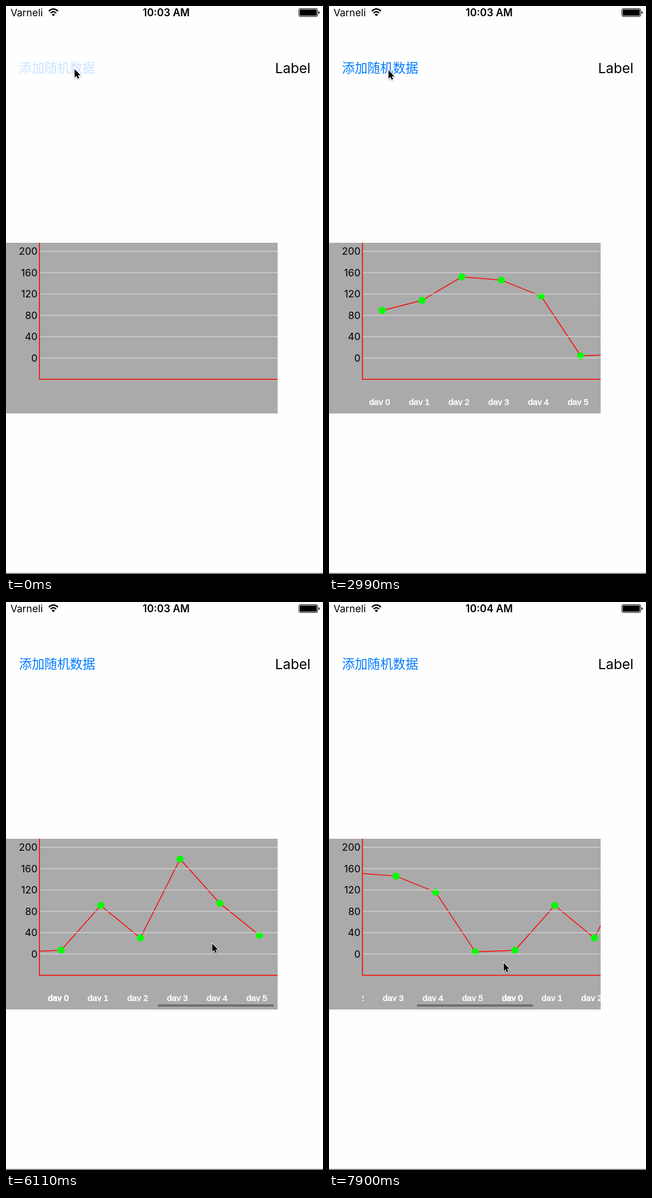
Write an HTML page that moves like this. It is 559 px wide and 998 px high and loops after 8 s.

```html
<!DOCTYPE html>
<html lang="zh">
<head>
<meta charset="utf-8">
<title>Scrolling line chart</title>
<style>
  html, body { margin: 0; width: 100%; height: 100%; overflow: hidden; background: #fefefe; }
  svg { overflow: hidden; }
  #stage { display: block; width: 559px; height: 998px; }
  text { font-family: Inter, Roboto, sans-serif; font-size: 17.5px; }
  #clock { font-size: 18px; font-weight: 600; text-anchor: middle; }
  #button { font-family: "Noto Sans CJK SC", "Noto Sans CJK", sans-serif; font-size: 22.4px; fill: #007aff; }
  #title { font-size: 24.4px; text-anchor: end; }
  #scale text { text-anchor: end; }
  .day { font-family: "Liberation Sans", Arial, sans-serif; font-size: 15px; fill: #fff; stroke: #fff; stroke-width: .6; }
  .day.double { stroke-width: 1; }
  .series { fill: none; stroke: #f00; stroke-width: 1.5; }
  .dot { fill: #0f0; }
  .grid { stroke: #d0d0d0; stroke-width: 1.3; }
</style>
</head>
<body>
<svg id="stage" viewBox="0 0 559 998">
  <rect width="559" height="998" fill="#fefefe"/>
  <rect y="996" width="559" height="2" fill="#858585"/>

  <text x="8" y="18">Varneli</text>
  <g fill="none" stroke="#000" stroke-width="2.4">
    <path d="M75.5 9Q83.5 1.6 91.5 9M78.6 12.3Q83.5 7.8 88.4 12.3"/>
    <path d="M83.5 18L80.6 14.9Q83.5 12.3 86.4 14.9Z" fill="#000" stroke="none"/>
  </g>
  <text id="clock" x="282.5" y="18">10:03 AM</text>
  <rect x="516.5" y="4.5" width="33" height="14" rx="2.5" fill="none" stroke="#000"/>
  <rect x="518" y="6" width="30" height="11" rx="1.2"/>
  <path d="M551 9Q553 9.5 553 11.5T551 14Z"/>

  <text id="button" x="23" y="117">添加随机数据</text>
  <text id="title" x="537" y="117.6">Label</text>

  <rect y="416" width="479" height="300" fill="#aaa"/>
  <g id="scale"></g>
  <svg x="59" y="416" width="420" height="300">
    <g id="content"></g>
    <svg width="420" height="285.5"><g id="days"></g></svg>
    <g id="grid"></g>
    <rect id="thumb" y="291" width="205" height="4" rx="2"/>
  </svg>
  <path d="M59 416V655.7H479" fill="none" stroke="#f00" stroke-width="1.6"/>

  <path id="cursor" d="M0 0V14.5L3.3 11.4L5.5 16.6L8 15.5L5.8 10.5H10.3Z"
        stroke="#fff" stroke-width="1.8" paint-order="stroke"
        style="filter:drop-shadow(0 1px 1px #0005)"/>
</svg>
<script>
const LOOP = 8000, TICK = 148.9;
const PAGE = 420, STEP = 70;
const FIRST_ADD = 140, SECOND_PRESS = 2530, SECOND_ADD = 2670, MINUTE = 7440;
const older = [7, 91, 30, 178, 95, 35];
const newer = [89, 108, 152, 146, 116, 4];

// Pointer stops: [time, x, y]
const stops = [[450, 121, 111], [1350, 425, 133], [2080, 105, 113], [3450, 105, 113],
  [4630, 227, 520], [4910, 207, 532], [5230, 110, 545], [5655, 347, 581],
  [6550, 380, 619], [7000, 250, 628], [7600, 475, 632], [7890, 308, 634]];

const $ = id => document.getElementById(id);
const valueY = value => 202.5 - value * 37.5 / 40;

function ease(t, from, to) {
  const k = Math.min(1, Math.max(0, (t - from) / (to - from)));
  return k * k * (3 - 2 * k);
}

function pointerAt(t) {
  let [, x, y] = stops[0];
  for (let i = 1; i < stops.length; i++) {
    const k = ease(t, stops[i - 1][0], stops[i][0]);
    x += (stops[i][1] - stops[i - 1][1]) * k;
    y += (stops[i][2] - stops[i - 1][2]) * k;
  }
  return [x, y];
}

const scrollAt = t => PAGE * ease(t, 4910, 6167) - 234 * ease(t, 7150, 7890);
const thumbAlpha = t => .35 * (ease(t, 4910, 5060) - ease(t, 6460, 6700) + ease(t, 7150, 7290));
const buttonAlpha = t => .2 + .8 * (t < SECOND_PRESS ? ease(t, 0, 600) : ease(t, SECOND_PRESS, 2970));

function add(parent, tag, attrs, text = "") {
  const node = document.createElementNS("http://www.w3.org/2000/svg", tag);
  for (const key in attrs) node.setAttribute(key, attrs[key]);
  node.textContent = text;
  return parent.appendChild(node);
}

function buildSeries(values, joinTo) {
  const plot = add($("content"), "g", {}), labels = add($("days"), "g", {});
  const points = values.concat(joinTo).map((value, i) => [35 + STEP * i, valueY(value)]);
  add(plot, "polyline", { class: "series", points: points.join(" ") });
  values.forEach((value, i) => {
    const [cx, cy] = points[i];
    add(plot, "circle", { class: "dot", cx, cy, r: 6.2 });
    add(labels, "text", { class: "day", x: cx - 23, y: 284.5 }, "day " + i);
  });
  return [plot, labels];
}

for (let value = 0; value <= 200; value += 40) {
  const y = valueY(value);
  add($("scale"), "text", { x: 55.5, y: 416 + y + 6.4 }, value);
  add($("grid"), "line", { class: "grid", x1: 0, x2: PAGE, y1: y, y2: y });
}
const newLayers = buildSeries(newer, [older[0]]);
const oldLayers = buildSeries(older, []);
const joinLabel = oldLayers[1].firstChild;

function place(layers, visible, x) {
  for (const layer of layers) {
    layer.setAttribute("display", visible ? "inline" : "none");
    layer.setAttribute("transform", `translate(${x})`);
  }
}

function draw(elapsed) {
  const t = Math.floor(elapsed % LOOP / TICK) * TICK;
  const offset = scrollAt(t), both = t >= SECOND_ADD;
  place(newLayers, both, -offset);
  place(oldLayers, t >= FIRST_ADD, (both ? PAGE : 0) - offset);
  joinLabel.classList.toggle("double", both);
  $("thumb").setAttribute("x", 5 + offset * 205 / PAGE);
  $("thumb").setAttribute("opacity", thumbAlpha(t));
  $("button").setAttribute("opacity", buttonAlpha(t));
  $("cursor").setAttribute("transform", `translate(${pointerAt(t)})`);
  $("clock").textContent = t >= MINUTE ? "10:04 AM" : "10:03 AM";
}

const start = performance.now();
function loop() {
  draw(performance.now() - start);
  requestAnimationFrame(loop);
}
loop();
</script>
</body>
</html>
```
